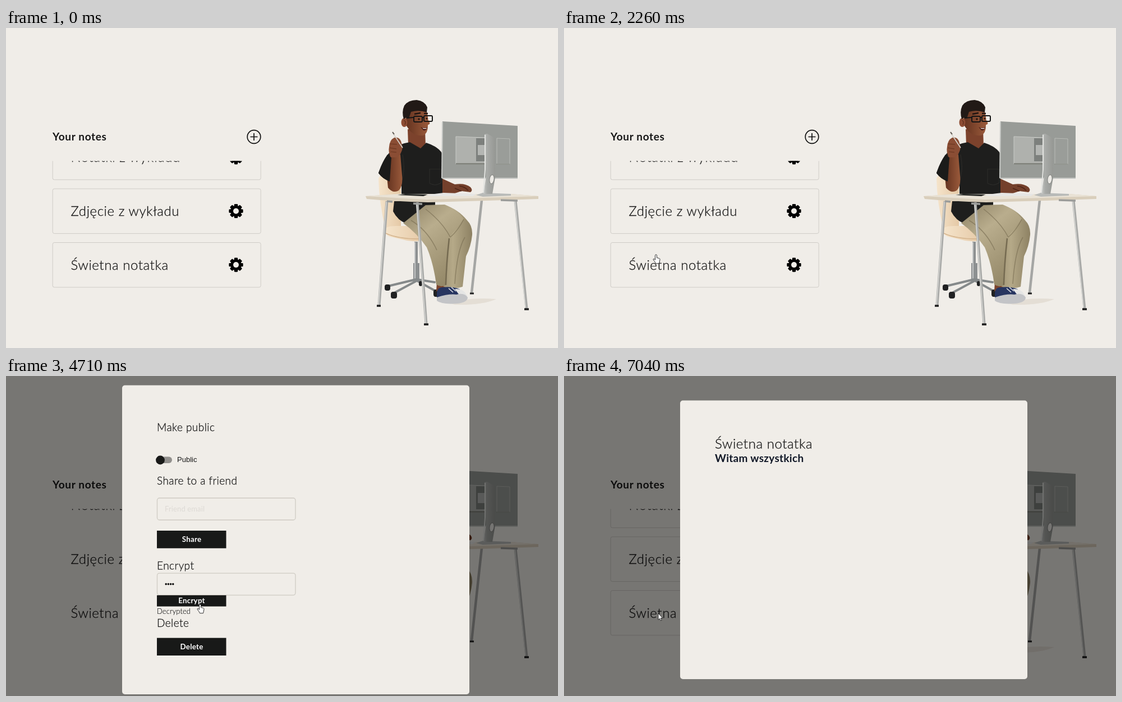
Animation of 984 by 569 pixels, one loop 8.63 s. Source, as an HTML page:

```html
<!DOCTYPE html>
<html lang="pl">
<head>
<meta charset="utf-8">
<title>Your notes</title>
<style>
  html, body { margin: 0; width: 100%; height: 100%; overflow: hidden; background: #f0ede8; }
  svg { display: block; width: 984px; height: 569px; }
  text { font-family: Lato, sans-serif; fill: #171717; }
  .title, .head { font-weight: 300; letter-spacing: .024em; stroke: #171717; stroke-width: .3; }
  .title { font-size: 24px; }
  .head { font-size: 19px; }
  .bold { font-size: 19px; font-weight: 700; letter-spacing: .022em; }
  .small { font-size: 12.8px; font-weight: 300; stroke: #171717; stroke-width: .15; }
  .hint { font-size: 13px; fill: #dddad5; letter-spacing: .01em; }
  .label { font: 13px "Liberation Sans", Arial, sans-serif; }
  .btn text { font-size: 13.3px; font-weight: 700; letter-spacing: .02em; fill: #fff; text-anchor: middle; }
  .btn rect { fill: #181918; }
  .field { fill: none; stroke: #cfccc4; stroke-width: 1.3; }
  .card { fill: none; stroke: #cfccc7; }
  .panel { fill: #f0ede8; }
</style>
</head>
<body>
<svg viewBox="0 0 984 569">
  <defs>
    <linearGradient id="skin"><stop stop-color="#63321f"/><stop offset="1" stop-color="#9a5a3b"/></linearGradient>
    <linearGradient id="thigh" x2=".6" y2="1"><stop stop-color="#8b7f62"/><stop offset=".4" stop-color="#b9ad8d"/><stop offset="1" stop-color="#958969"/></linearGradient>
    <linearGradient id="shin"><stop stop-color="#7d7155"/><stop offset=".6" stop-color="#b5a988"/><stop offset="1" stop-color="#8d8163"/></linearGradient>
    <linearGradient id="cream"><stop stop-color="#f5e4cb"/><stop offset="1" stop-color="#e5c9a6"/></linearGradient>
    <linearGradient id="metal"><stop stop-color="#c9cac7"/><stop offset=".3" stop-color="#a9aba8"/><stop offset="1" stop-color="#969894"/></linearGradient>
    <clipPath id="listClip"><path d="M70 236.5H470V480H70Z"/></clipPath>
    <g id="gear">
      <circle r="9.8"/>
      <rect id="bar" x="-3.2" y="-12.6" width="6.4" height="25.2" rx="1.4"/>
      <use href="#bar" transform="rotate(45)"/><use href="#bar" transform="rotate(90)"/><use href="#bar" transform="rotate(135)"/>
      <circle r="5" fill="#f0ede8"/>
    </g>
  </defs>

  <text class="bold" x="83" y="200" style="letter-spacing:.034em">Your notes</text>
  <g fill="none" stroke="#111" stroke-width="1.7"><circle cx="442" cy="193.5" r="11.8"/><path d="M435.5 193.5h13M442 187v13"/></g>
  <g id="list" clip-path="url(#listClip)"></g>

  <g id="worker">
    <path class="faint" d="M790 489Q825 478 874 482Q850 493 800 492Z" fill="#e4ded5"/>
    <!-- chair -->
    <path d="M664 268Q666 261 674 263L704 272V356L676 355Q665 310 664 268Z" fill="url(#cream)"/>
    <path d="M676 358Q678 351 700 352H745V376Q735 381 715 378L684 371Q675 368 676 358Z" fill="url(#cream)"/>
    <path d="M677 365Q700 376 744 375" fill="none" stroke="#d5b58f" stroke-width="1.5"/>
    <path d="M728 380H734V418H737V450H726V418H728Z" fill="#8d9091"/>
    <path d="M729 381V448" stroke="#c4c6c6" stroke-width="2"/>
    <path d="M731 447L681 459M731 450L692 471M732 449L768 469M732 447L764 452" stroke="#85898a" stroke-width="4" stroke-linecap="round"/>
    <g fill="#202122"><rect x="675" y="456" width="10" height="11" rx="4"/><rect x="686" y="469" width="11" height="12" rx="4"/><rect x="762" y="465" width="9" height="13" rx="4"/><rect x="736" y="450" width="6" height="9" rx="3"/></g>
    <!-- far desk legs -->
    <path d="M848 306L830 471" stroke="#a5a6a4" stroke-width="4.5"/><path d="M827 472h7" stroke="#222" stroke-width="3"/>
    <!-- lower body -->
    <path d="M692 308H765V325L714 348Q698 342 690 326Z" fill="#1e1e1d"/>
    <path d="M768 452L784 458L781 470L767 468Z" fill="#7b432c"/>
    <path d="M745 330L780 314Q806 322 822 342Q832 352 831 368Q829 388 820 406L814 460Q798 466 780 460L785 386Z" fill="url(#shin)"/>
    <path d="M708 347L748 315L782 314Q806 324 816 340L790 372L788 400Q782 430 784 457Q775 462 767 456Q762 418 750 390Q732 364 708 347Z" fill="url(#thigh)"/>
    <path d="M790 374Q785 420 784 457" fill="none" stroke="#5f553e" stroke-width="2.5" opacity=".7"/>
    <path d="M748 322Q778 345 792 372M818 372Q804 395 800 455M722 342Q752 360 768 395M792 372Q806 360 816 340" fill="none" stroke="#776c51" stroke-width="1.5" opacity=".6"/>
    <path d="M768 471Q769 460 779 461Q794 459 808 464L821 476L819 482H768Z" fill="#273560"/>
    <path d="M800 464Q817 463 822 477L812 480Z" fill="#e5e5e4"/>
    <path d="M768 479Q790 472 803 474Q817 470 823 479Q823 488 804 490Q777 492 768 485Z" fill="#c3c4c7"/>
    <path d="M789 463l8 7M794 461l8 7" stroke="#e5e6ea" stroke-width="1.5"/>
    <!-- upper body -->
    <path d="M716 180L747 180L748 210L738 222L717 207Z" fill="#7c422c"/>
    <path d="M720 203Q699 206 687 217Q672 234 664 258Q672 269 686 273L705 267V298H778V224Q771 211 749 204L739 214Z" fill="#1e1e1d"/>
    <path d="M755 251h21v24q-11 7-21 1ZM707 225q5 25-1 45" fill="none" stroke="#2b2b29" stroke-width="1.2"/>
    <path d="M682 231Q684 222 703 225L706 262Q708 281 700 289Q690 295 681 284L679 264Z" fill="url(#skin)"/>
    <path d="M664 258Q670 239 680 225L687 230L684 273Q671 268 664 258Z" fill="#1b1b1a"/>
    <path d="M683 211Q684 199 692 195Q700 193 704 201L707 212Q705 226 696 230H686Q681 221 683 211Z" fill="#8a4d34"/>
    <path d="M685 206l12 1M684 213l12 2M686 220l10 1" stroke="#66341f" stroke-width="1.2"/>
    <path d="M689 186L707 213" stroke="#d5d2cb" stroke-width="1.7"/><path d="M689 185l3 4" stroke="#5b554e" stroke-width="1.8"/>
    <!-- head -->
    <path d="M712 151Q719 143 749 145Q754 160 752 174Q752 187 744 191Q730 193 720 183L714 174Z" fill="url(#skin)"/>
    <path d="M749 160Q757 167 755 171L750 173Z" fill="#955638"/>
    <ellipse cx="710" cy="168" rx="5.5" ry="8" fill="#8e4d34"/><path d="M709 164q5 2 2 8" fill="none" stroke="#5c2e1d" stroke-width="1.3"/>
    <path d="M709 162Q705 149 710 138Q717 128 732 128Q747 130 751 141L750 150Q736 145 722 149L718 161L714 159Z" fill="#211916"/>
    <path d="M728 153l11-2M745 152l7 0" stroke="#201512" stroke-width="2.4"/>
    <circle cx="736" cy="162" r="1.8" fill="#25140e"/><circle cx="750" cy="161" r="1.6" fill="#25140e"/>
    <g fill="none" stroke="#151515" stroke-width="2"><rect x="727" y="157" width="15" height="10" rx="2"/><rect x="745" y="156" width="15" height="10" rx="2"/><path d="M714 160L727 159M742 159h3"/></g>
    <path d="M739 176Q745 179 751 176Q750 183 744 182Z" fill="#4b1d17"/><path d="M742 177.6q4 1 8 0l-1 1.6h-5Z" fill="#f4eee8"/>
    <!-- desk -->
    <path d="M778 268L800 278Q818 275 828 283Q833 289 828 292L812 290L800 294H778Z" fill="#74402b"/>
    <path d="M808 281q10 1 16 8M800 285l12 5" fill="none" stroke="#4d2417" stroke-width="1.4"/>
    <path d="M641 299L700 295H900L949 299V304L890 306L752 310Q690 308 643 304Z" fill="#d9cebb"/>
    <path d="M641 299L700 295H900L949 299L750 305Z" fill="#e9e2d5"/>
    <path d="M698 297L712 295L752 296L744 299Z" fill="#242624"/>
    <path d="M748 297L780 293L838 295L832 299H758Z" fill="#e6e6e4"/>
    <path d="M679 308L665 493M733 310L749 526M908 306L928 499" stroke="#a9aaa8" stroke-width="5"/>
    <path d="M678 309L664 492M732 311L748 525M907 307L926 497" stroke="#d9d9d6" stroke-width="1.5"/>
    <path d="M726 312L742 313M679 308L689 309M882 306L912 307" stroke="#9b9c9a" stroke-width="3.5"/>
    <path d="M661 494h7M745 527h8M924 500h8" stroke="#1c1c1c" stroke-width="3.5"/>
    <!-- monitor -->
    <path d="M778 166L912 174V267L777 268Z" fill="#989b97"/><path d="M778 167L777 267" stroke="#c8cac7" stroke-width="2"/>
    <path d="M778 267H912" stroke="#bfc1be" stroke-width="2"/>
    <path d="M802 193L853 195V242H802Z" fill="#afb1ad" stroke="#c9cbc7"/><path d="M802 241.5H853" stroke="#74766f" stroke-width="2"/>
    <path d="M838 196H853V237H838Z" fill="#7d807d"/><path d="M841 208H853V226H841Z" fill="#b4b6b3"/>
    <path d="M875 196L898 197V242H875Z" fill="#9a9d99" stroke="#b9bbb6"/><path d="M874 242H898" stroke="#7e817b"/>
    <path d="M838 297L850 293L900 295V298L850 300Z" fill="#b8bab8"/>
    <path d="M853 189L858 188L872 196V266L867 295H851L856 263Z" fill="url(#metal)"/>
    <path d="M854 190V252L851 293" fill="none" stroke="#e2e3e0" stroke-width="2"/>
    <ellipse cx="866" cy="269" rx="4" ry="8" transform="rotate(8 866 269)" fill="#eceae5" stroke="#80827f"/>
  </g>

  <rect id="dim" width="984" height="569" opacity=".5"/>

  <g id="cipher">
    <rect class="panel" x="207" y="43.5" width="619" height="495.5" rx="5"/>
    <text class="bold" x="269" y="119.5" style="font-size:13px;fill:#931517">Encrypted</text>
    <text class="title" x="269" y="147.5">Świetna notatka</text>
    <text class="small" x="269" y="167.5">U2FsdGVkX19/Oti5nqHmz5Bbuma27RL6mt</text>
    <text class="small" x="269" y="188.5">iKUy+VobUBtKrysSIUCo+h9eRQjYHz</text>
  </g>

  <g id="settings">
    <rect class="panel" x="207" y="16.5" width="619" height="549.5" rx="5"/>
    <text class="head" x="269" y="98">Make public</text>
    <rect x="269" y="143.5" width="27" height="11.5" rx="5.7" fill="#92908d"/><circle cx="275" cy="149.5" r="7.9" fill="#181918"/>
    <text class="label" x="305" y="152.7">Public</text>
    <text class="head" x="269" y="192.5">Share to a friend</text>
    <rect class="field" x="269.5" y="217" width="246.5" height="39" rx="4"/>
    <text class="hint" x="283" y="241">Friend email</text>
    <g class="btn"><rect x="269" y="275" width="123.5" height="31.3"/><text x="331" y="295">Share</text></g>
    <g id="secret">
      <text id="secretHead" class="head" x="269" y="353"></text>
      <rect class="field" x="269.5" y="359.3" width="246.5" height="39" rx="4"/>
      <g id="dots"></g>
      <rect id="caret" y="371" width="1.4" height="15.5"/>
      <g class="btn"><rect x="269" y="398.6" width="123.5" height="19.8"/><text id="secretBtn" x="331" y="413"></text></g>
    </g>
    <text id="done" class="small" x="269" y="422.7" style="letter-spacing:.015em">Decrypted</text>
    <text class="head" x="269" y="445.5">Delete</text>
    <g class="btn"><rect x="269" y="465.7" width="123.5" height="31.3"/><text x="331" y="485.5">Delete</text></g>
  </g>

  <g id="plain">
    <rect class="panel" x="207" y="43.5" width="619" height="495.5" rx="5"/>
    <text class="title" x="269" y="128.5">Świetna notatka</text>
    <text class="bold" x="269" y="153" style="fill:#111827;letter-spacing:.015em">Witam wszystkich</text>
  </g>

  <g id="cursor" fill="#fff" stroke="#1b1b1b" stroke-width=".9" stroke-linejoin="round">
    <path id="arrow" d="M0 0V11.5L2.6 9.2L4.4 13L6.2 12.2L4.5 8.5H8Z"/>
    <path id="hand" d="M-1.5 1.5a1.5 1.5 0 0 1 3 0v4l4 1q1.6.5 1.5 2l-.8 4.5-.7 2.8h-6l-1.5-3-3-4q0-2 2-1l1.5 1.5z"/>
    <path id="beam" d="M-2.5-5.5Q0-5.5 0-4.5Q0-5.5 2.5-5.5M0-4.5V4.5M-2.5 5.5Q0 5.5 0 4.5Q0 5.5 2.5 5.5" fill="none"/>
  </g>
</svg>
<script>
const LOOP = 8630;
const $ = id => document.getElementById(id);
const show = (el, on) => { el.style.display = on ? '' : 'none'; };

const notes = ['Notatki z wykładu', 'Zdjęcie z wykładu', 'Świetna notatka'];
$('list').innerHTML = notes.map((name, i) => {
  const y = 190.3 + i * 95.6;
  return `<rect class="card faint" x="83.2" y="${y}" width="371" height="79.5" rx="3"/>
    <text class="title" x="115.5" y="${y + 48}">${name}</text>
    <use href="#gear" x="410" y="${y + 39.6}"/>`;
}).join('');
$('dots').innerHTML = [0, 1, 2, 3].map(i => `<circle cx="${285.2 + i * 4.2}" cy="378.6" r="1.75"/>`).join('');

// Pointer stops: time, x, y
const path = [
  [340, 200, 536], [640, 224, 406], [810, 233, 419], [1870, 233, 419],
  [2120, 164, 403], [2250, 164, 403], [2720, 408, 421], [2850, 408, 421],
  [3370, 350, 374], [4140, 350, 374], [4340, 346, 406], [5410, 346, 406],
  [5800, 163, 402], [6120, 163, 402], [6280, 168, 422], [LOOP, 168, 422]
];
// Each entry: start time, value
const modals = [[0, ''], [1460, 'cipher'], [2170, ''], [2850, 'settings'], [5870, ''], [6400, 'plain']];
const pointers = [
  [0, 'arrow'], [500, 'hand'], [1090, 'arrow'], [1180, 'hand'], [1490, 'arrow'], [2200, 'hand'],
  [2880, 'arrow'], [3200, 'beam'], [4300, 'hand'], [5540, 'arrow'], [5900, 'hand'], [6960, 'arrow']
];
const typed = [[0, 0], [3870, 1], [3960, 2], [4050, 3], [4140, 4]];
const at = (steps, t) => steps.findLast(s => s[0] <= t)[1];

function position(t) {
  const i = Math.max(1, path.findIndex(p => p[0] > t));
  const [t0, x0, y0] = path[i - 1], [t1, x1, y1] = path[i];
  const u = Math.max(0, (t - t0) / (t1 - t0));
  const k = u ** 3 * (10 - 15 * u + 6 * u * u);
  return [x0 + (x1 - x0) * k, y0 + (y1 - y0) * k];
}

function draw(t) {
  const modal = at(modals, t), pointer = at(pointers, t), count = at(typed, t);
  const open = t >= 4710;
  for (const id of ['cipher', 'settings', 'plain']) show($(id), id === modal);
  show($('dim'), modal);
  document.querySelectorAll('.faint').forEach(el => show(el, !modal || modal === 'plain'));

  $('secretHead').textContent = $('secretBtn').textContent = open ? 'Encrypt' : 'Decrypt';
  $('secret').setAttribute('transform', `translate(0 ${open ? -8.7 : 0})`);
  [...$('dots').children].forEach((dot, i) => show(dot, i < count));
  $('caret').setAttribute('x', 282.8 + count * 4.2);
  show($('caret'), t >= 3560 && t < 4590);
  show($('done'), open);

  show($('cursor'), t >= 370);
  for (const id of ['arrow', 'hand', 'beam']) show($(id), id === pointer);
  $('cursor').setAttribute('transform', `translate(${position(t)})`);
}

function tick() {
  draw(performance.now() % LOOP);
  requestAnimationFrame(tick);
}
tick();
</script>
</body>
</html>
```
